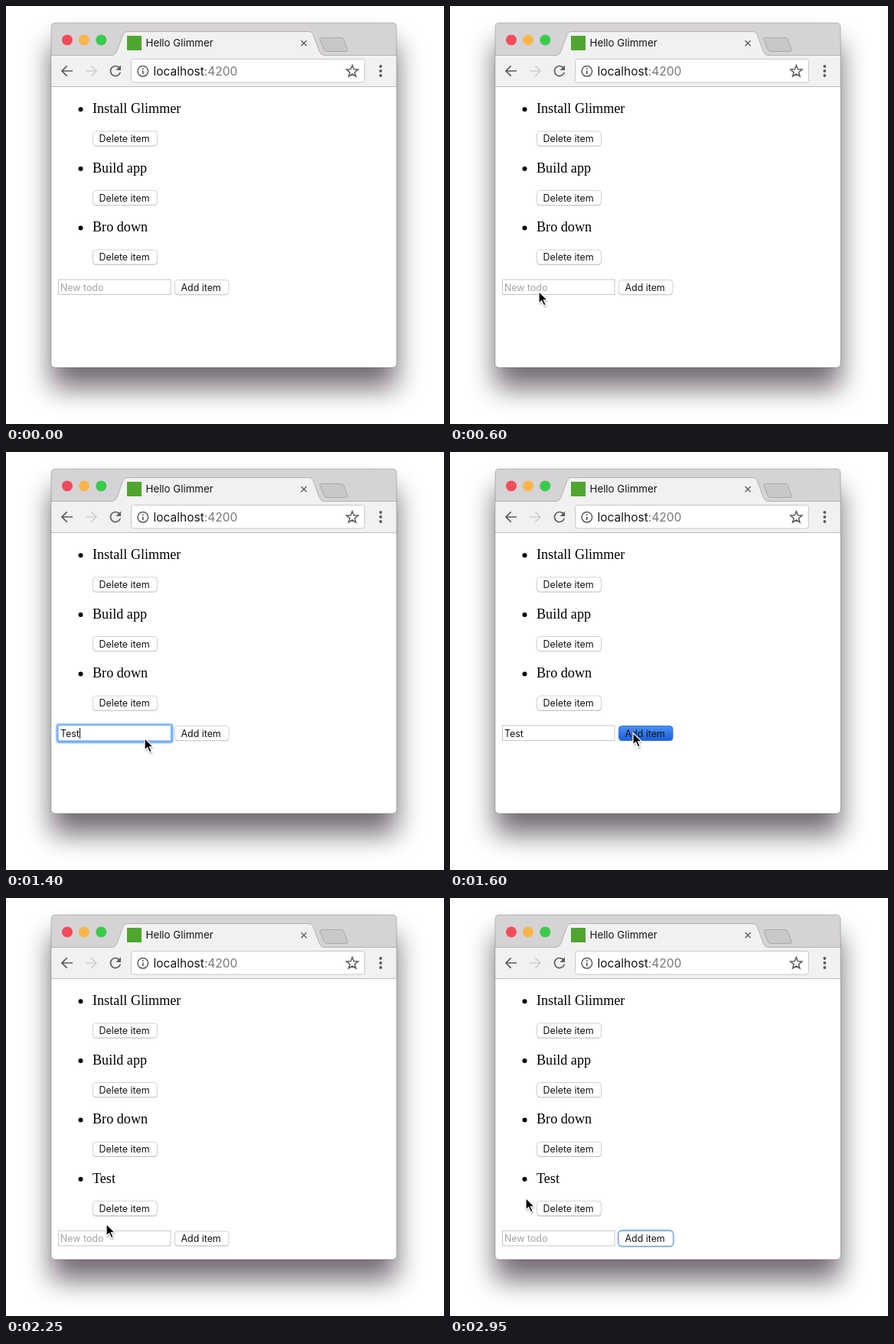
An HTML page that plays this animation: 572 by 547 pixels, repeating every 3 s.

```html
<!DOCTYPE html>
<html lang="en">
<head>
<meta charset="utf-8">
<title>Todo list</title>
<style>
  html, body { margin: 0; width: 100%; height: 100%; overflow: hidden; background: #fff; }
  svg { display: block; }
  text { font-family: Inter, Roboto, sans-serif; font-size: 12.4px; white-space: pre; }
  .item { font-family: "Liberation Serif", "Times New Roman", serif; font-size: 18.15px; }
  .line { fill: none; stroke: #5c5b5d; stroke-width: 1.7; }
</style>
</head>
<body>
<svg width="572" height="547" viewBox="0 0 572 547">
  <defs>
    <filter id="shadow" filterUnits="userSpaceOnUse" x="-20" y="-20" width="620" height="600">
      <feGaussianBlur stdDeviation="17.5"/>
    </filter>
    <filter id="soft" x="-50%" y="-50%" width="200%" height="200%">
      <feGaussianBlur stdDeviation="1.3"/>
    </filter>
    <linearGradient id="pressed" x2="0" y2="1">
      <stop stop-color="#4b91f7"/><stop offset="1" stop-color="#1a5fdc"/>
    </linearGradient>
    <clipPath id="frame"><rect x="59" y="22" width="451" height="451" rx="5"/></clipPath>
    <g id="button-face">
      <rect x=".5" y="1" width="100%" height="19.5" rx="4"/>
    </g>
  </defs>

  <rect x="59" y="49" width="451" height="451" rx="5" fill="#08040a" opacity=".58" filter="url(#shadow)"/>

  <g clip-path="url(#frame)">
    <rect x="59" y="22" width="451" height="451" fill="#fff"/>
    <rect x="59" y="22" width="451" height="43" fill="#d6d3d6"/>
    <rect x="59" y="64" width="451" height="42" fill="#f2f1f2"/>
    <path d="M59 64.5H139Q143 64 145 59L153 37Q154.500 33.500 158 33.500H396Q399.500 33.500 401 37L409 59Q411 64 415 64.500H510" fill="#f2f1f2" stroke="#b3b0b3"/>
    <path d="M59 105.500H510" stroke="#bdbbbd"/>
  </g>
  <rect x="59" y="22" width="451" height="451" rx="5" fill="none" stroke="#000" stroke-opacity=".2"/>

  <circle cx="80" cy="44.500" r="7" fill="#f24b5a"/>
  <circle cx="102" cy="44.500" r="7" fill="#f8b64a"/>
  <circle cx="124.300" cy="44.500" r="7" fill="#39cc4b"/>
  <rect x="158" y="39" width="19" height="19" fill="#4fa62e"/>
  <text x="182.500" y="53.300" style="font-size:13.3px" fill="#161616">Hello Glimmer</text>
  <path class="line" style="stroke-width:1.4" d="M385.500 45.300l7 7m0-7l-7 7"/>
  <path d="M411.500 41.500H438Q440 41.500 441 43.500L446 57Q446.500 59.500 444 59.500H419Q416.500 59.500 415.500 57.500L410 44Q409.500 41.500 411.500 41.500Z" fill="#cac7ca" stroke="#aaa7aa"/>

  <path class="line" d="M87 85H73m6.700-6.700L73 85l6.700 6.700"/>
  <path class="line" style="stroke:#d0ced0" d="M104 85h14m-6.700-6.700L118 85l-6.700 6.700"/>
  <path class="line" d="M147.600 80.400A6.500 6.500 0 1 0 149.300 86.600"/>
  <path d="M150 77.500v6.500h-6.500z" fill="#5c5b5d"/>
  <rect x="163.500" y="69.500" width="305" height="30.500" rx="3.500" fill="#fff" stroke="#c9c7c9"/>
  <circle class="line" cx="178.800" cy="85.300" r="6.800" style="stroke-width:1.500"/>
  <path class="line" d="M178.800 81.300v1.700m0 1.500v4.800"/>
  <text x="192.500" y="91" style="font-size:15.5px" fill="#161616">localhost<tspan fill="#777">:4200</tspan></text>
  <path id="star" class="line" style="stroke-width:1.500"/>
  <g fill="#5c5b5d">
    <circle cx="489.300" cy="79" r="1.900"/><circle cx="489.300" cy="85" r="1.900"/><circle cx="489.300" cy="91" r="1.900"/>
  </g>

  <g id="list"></g>

  <g id="form">
    <g id="inputFocus">
      <rect x="67.500" y="357.500" width="149" height="21.500" rx="2" fill="none" stroke="#4b9af5" stroke-width="3.500" filter="url(#soft)"/>
      <rect x="67.800" y="357.300" width="148.200" height="21.500" rx="1.500" fill="none" stroke="#70b0f5" stroke-width="2.200"/>
    </g>
    <rect id="input" x="68.500" y="358" width="146.500" height="19.500" fill="#fff" stroke="#c6c6c9"/>
    <text id="value" x="71" y="372.800"></text>
    <path id="caret" stroke="#111" d="M0 361v14"/>
    <rect id="addFocus" x="220.200" y="358" width="71" height="20" rx="4.500" fill="none" stroke="#75b1ef" stroke-width="3"/>
    <g id="add"></g>
  </g>

  <g id="cursor">
    <path d="M1 3v16l4-3.500 3 6.500 3-1.400-3-6.100h5z" fill="#000" opacity=".45" filter="url(#soft)"/>
    <path d="M1 1.500V17.300L4.700 13.900 7.500 20 10.200 18.800 7.500 12.800H12.300Z" fill="#000" stroke="#fff" stroke-width="1.300"/>
  </g>
</svg>

<script>
const LOOP = 3000, TICK = 50, ROW = 77.6;
const $ = id => document.getElementById(id);
const show = (id, on) => $(id).setAttribute('visibility', on ? 'visible' : 'hidden');

const button = (x, y, width, label, id = '') => `
  <rect x="${x + .5}" y="${y + 1.2}" width="${width}" height="19" rx="4" fill="#a9a9ab"/>
  <rect ${id && `id="${id}"`} x="${x + .5}" y="${y + .5}" width="${width}" height="19" rx="4" fill="#fff" stroke="#cfcfd1" stroke-width=".9"/>
  <text x="${x + 8.5}" y="${y + 14.6}" fill="#111">${label}</text>`;

$('list').innerHTML = ['Install Glimmer', 'Build app', 'Bro down', 'Test'].map((label, i) => `
  <g id="item${i}" transform="translate(0 ${i * ROW})">
    <circle cx="97.500" cy="135.300" r="3"/>
    <text class="item" x="113" y="140">${label}</text>
    ${button(113, 163.4, 84, 'Delete item')}
  </g>`).join('');
$('add').innerHTML = button(220, 358, 70.5, 'Add item', 'addFace');

const starPoints = Array.from({ length: 10 }, (_, i) => {
  const radius = i % 2 ? 3.4 : 8, angle = i * Math.PI / 5;
  return [452.2 + radius * Math.sin(angle), 85.6 - radius * Math.cos(angle)].map(v => v.toFixed(1));
});
$('star').setAttribute('d', 'M' + starPoints.join('L') + 'Z');

// Pointer paths: [time, x, y]
const moves = [
  [[50, 50, 412], [250, 92, 408], [400, 118, 392], [600, 115, 372], [800, 113, 377]],
  [[1250, 115, 376], [1400, 180, 373], [1550, 236, 366], [1600, 238, 366], [1800, 238, 366]],
  [[1800, 238, 366], [1900, 190, 342], [2000, 104, 336], [2050, 85, 345], [2150, 78, 392],
   [2250, 130, 425], [2350, 212, 410], [2400, 228, 390], [2450, 218, 370], [2500, 187, 364],
   [2600, 110, 372], [2700, 87, 392]],
  [[2700, 87, 392], [2850, 87, 392]],
  [[2850, 87, 392], [2900, 92, 392], [2950, 98, 391]]
];

function pointAt(path, t) {
  const i = Math.max(0, path.findIndex((p, n) => n && t <= p[0]) - 1);
  const a = path[i], b = path[i + 1], span = b[0] - a[0], u = (t - a[0]) / span;
  const slope = (n, k) => {
    const p = path[n - 1], q = path[n + 1];
    return p && q ? (q[k] - p[k]) / (q[0] - p[0]) * span : b[k] - a[k];
  };
  return [1, 2].map(k => {
    if (a[k] === b[k]) return a[k];
    const d = b[k] - a[k], m = slope(i, k), n = slope(i + 1, k);
    return a[k] + u * (m + u * (3 * d - 2 * m - n + u * (m + n - 2 * d)));
  });
}

const typing = [[1000, 'T'], [1050, 'Te'], [1150, 'Tes'], [1200, 'Test'], [1650, '']];

function render(now) {
  const t = Math.floor(now % LOOP / TICK) * TICK;
  const focused = t >= 800 && t < 1550;
  const pressed = t >= 1550 && t < 1650;
  const added = t >= 1650;

  const typed = typing.filter(([start]) => t >= start).pop()?.[1] ?? '';
  $('value').textContent = typed || 'New todo';
  $('value').setAttribute('fill', typed ? '#111' : '#a2a2a4');
  show('inputFocus', focused);
  $('input').setAttribute('stroke', focused ? '#a8cdf4' : '#c6c6c9');
  show('caret', focused);
  const caretX = typed ? 71 + $('value').getComputedTextLength() + .7 : 71.5;
  $('caret').setAttribute('transform', `translate(${caretX} 0)`);

  $('addFace').setAttribute('fill', pressed ? 'url(#pressed)' : '#fff');
  $('addFace').setAttribute('stroke', pressed ? '#2f6fd6' : '#cfcfd1');
  show('addFocus', t >= 2900);
  show('item3', added);
  $('form').setAttribute('transform', `translate(0 ${added ? ROW : 0})`);

  const path = moves.find(p => t >= p[0][0] && t <= p[p.length - 1][0]);
  const visible = path && !focused || path && t >= 1250;
  show('cursor', visible);
  if (visible) $('cursor').setAttribute('transform', `translate(${pointAt(path, t)})`);
}

function loop(now) {
  render(now);
  requestAnimationFrame(loop);
}
render(0);
requestAnimationFrame(loop);
</script>
</body>
</html>
```
